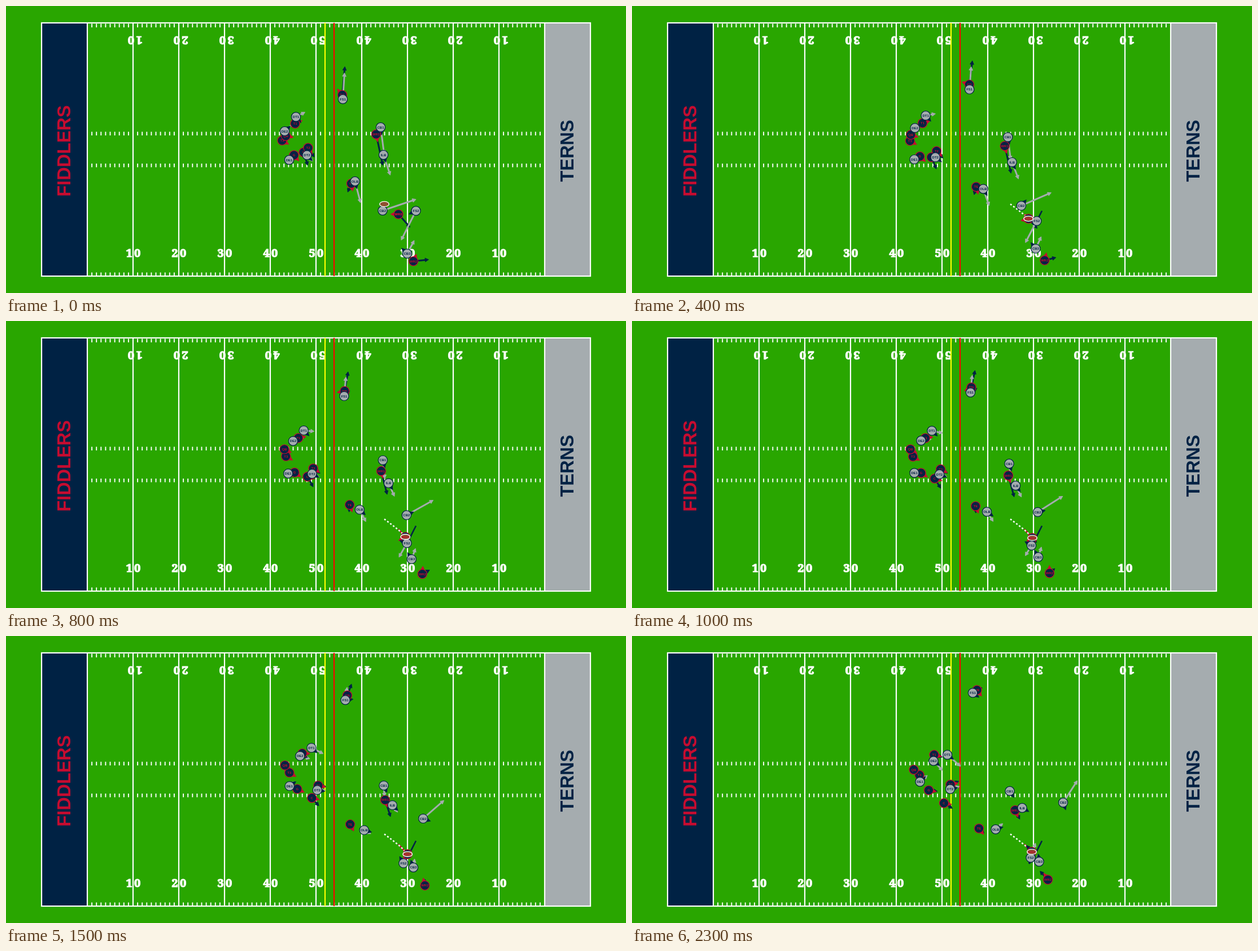
Write an HTML page that moves like this. It is 1098 px wide and 510 px high and loops after 2400 ms.

```html
<!DOCTYPE html>
<html lang="en">
<head>
<meta charset="utf-8">
<title>Football play</title>
<style>
  html, body { margin: 0; width: 100%; height: 100%; overflow: hidden; background: #29a600; }
  svg { display: block; width: 1098px; height: 510px; }
  text { text-anchor: middle; }
  .zone { font: bold 32.5px "Liberation Sans", Arial, sans-serif; }
  .yards {
    font: 900 20px "Noto Serif", serif; letter-spacing: 3.4px;
    fill: #fff; stroke: #fff; stroke-width: 1.2px;
  }
  .label { font: bold 6px "Liberation Sans", Arial, sans-serif; }
</style>
</head>
<body>
<svg id="stage" viewBox="0 0 1098 510"></svg>
<script>
const NAVY = '#002244', RED = '#c60c30', GRAY = '#a5acaf', WHITE = '#fff';
const LOOP = 2400, STEP = 100;
const MIDDLE = 1, END = 2.3;
const stage = document.getElementById('stage');

function add(parent, tag, attrs, text) {
  const el = document.createElementNS('http://www.w3.org/2000/svg', tag);
  for (const key in attrs) el.setAttribute(key, attrs[key]);
  if (text) el.textContent = text;
  parent.appendChild(el);
  return el;
}

// Field
const LEFT = 144, TOP = 30, BOTTOM = 480, YARD = 8.1;

function vertical(x, color) {
  add(stage, 'path', { d: `M${x} ${TOP}V${BOTTOM}`, stroke: color, 'stroke-width': 2.2 });
}

function endZone(x, fill, color, name, baseline) {
  add(stage, 'rect', { x, y: TOP, width: 81, height: BOTTOM - TOP, fill });
  add(stage, 'text', {
    class: 'zone', fill: color, transform: `translate(${baseline} 257.5) rotate(-90)`
  }, name);
}

function drawField() {
  add(stage, 'rect', { width: 1098, height: 510, fill: '#29a600' });
  endZone(63, NAVY, RED, 'FIDDLERS', 114);
  endZone(954, GRAY, NAVY, 'TERNS', 1004.5);

  let ticks = '';
  for (let yard = 1; yard < 100; yard++) {
    const x = (LEFT + yard * YARD).toFixed(1);
    for (const y of [31.5, 223.5, 280, 473.5]) ticks += `M${x} ${y}v6.5`;
  }
  add(stage, 'path', { d: ticks, stroke: WHITE, 'stroke-width': 1.9 });

  for (let i = 0; i <= 10; i++) vertical(LEFT + i * 81, WHITE);
  add(stage, 'rect', {
    x: 63, y: TOP, width: 972, height: BOTTOM - TOP, fill: 'none', stroke: WHITE, 'stroke-width': 2.2
  });

  for (let i = 1; i < 10; i++) {
    const x = LEFT + i * 81 + 2, yards = 50 - Math.abs(5 - i) * 10;
    add(stage, 'text', { class: 'yards', x, y: 446 }, yards);
    add(stage, 'text', { class: 'yards', transform: `translate(${x} 53.5) rotate(180)` }, yards);
  }
  vertical(565, '#ff0');
  vertical(581, '#f00');
}

drawField();
const trails = add(stage, 'g', { fill: 'none' });
const arrows = add(stage, 'g', {});
const bodies = add(stage, 'g', {});
const updates = [];

// Constant acceleration through three points at 0, MIDDLE and END.
function curve(p, q, r) {
  const first = (q - p) / MIDDLE, second = (r - q) / (END - MIDDLE);
  const bend = (second - first) / END, speed = first - bend * MIDDLE;
  return { at: t => p + t * (speed + bend * t), speed: t => speed + 2 * bend * t };
}

function route(start, middle, end) {
  const [x, y] = [0, 1].map(k => curve(start[k], middle[k], end[k]));
  return {
    at: t => [x.at(t), y.at(t)],
    pace: t => Math.hypot(x.speed(t), y.speed(t)),
    heading: t => Math.atan2(y.speed(t), x.speed(t)) * 180 / Math.PI
  };
}

function trail(at, attrs) {
  const line = add(trails, 'polyline', attrs);
  updates.push(t => {
    const points = [];
    for (let i = 0; i <= Math.round(t * 10); i++) points.push(at(i / 10).join());
    line.setAttribute('points', points.join(' '));
  });
}

const offense = { fill: NAVY, edge: RED }, defense = { fill: GRAY, edge: NAVY };

// The arrow reaches one second ahead; the pointer turns evenly between two looks,
// which follow the run unless given.
function player(name, team, start, middle, end, look = {}) {
  const run = route(start, middle, end);
  const { from = run.heading(0), to = run.heading(2) } = look;
  const turn = (to - from + 540) % 360 - 180;

  const under = add(arrows, 'g', {});
  const arrow = add(under, 'g', { fill: team.fill, stroke: team.fill });
  const shaft = add(arrow, 'path', { 'stroke-width': 3 });
  const head = add(arrow, 'path', { d: 'M0 0l-6-3.2v6.4z', 'stroke-linejoin': 'round' });
  const pointer = add(under, 'path', { d: 'M14.5 0l-8-4.2v8.4z', fill: team.edge });
  const body = add(bodies, 'g', {});
  add(body, 'circle', { r: 8.1, fill: team.fill, stroke: team.edge, 'stroke-width': 1.2 });
  add(body, 'text', { class: 'label', y: 2.1, fill: team.edge }, name);

  updates.push(t => {
    const pace = run.pace(t), place = `translate(${run.at(t)})`;
    under.setAttribute('transform', place);
    body.setAttribute('transform', place);
    arrow.setAttribute('transform', `rotate(${run.heading(t)})`);
    shaft.setAttribute('d', `M0 0H${Math.max(0, pace - 5)}`);
    head.setAttribute('transform', `translate(${pace})`);
    pointer.setAttribute('transform', `rotate(${from + turn * t / END})`);
  });
  return run;
}

player('RB', offense, [595.5, 158], [601, 118], [611, 96], { from: 230, to: 53 });
player('T1', offense, [512, 209], [519.5, 208], [535, 211]);
player('T3', offense, [489, 239], [497.5, 241], [509, 247], { from: 30 });
player('QB', offense, [495.5, 231], [493, 228], [499, 237.5], { from: 10 });
player('C', offense, [527, 260], [536, 280], [552.5, 297], { from: 20, to: 10 });
player('T2', offense, [535, 252], [546.5, 263.5], [564, 264]);
player('G', offense, [510, 265], [512, 270], [525.5, 274], { from: 50 });
player('TE', offense, [611.5, 315.5], [608.5, 329], [614.5, 342], { from: 80 });
player('WR1', offense, [655.5, 228], [666.5, 274.5], [678.5, 309.5]);
player('WR2', offense, [721.5, 453.5], [739.5, 448], [736.5, 433], { from: -67 });
const carrier = player('WR3', offense, [695, 370], [709, 385.5], [708, 383.5], { from: 180, to: 95 });

player('FS1', defense, [596.5, 165.5], [599.5, 127], [603.5, 101], { to: 36 });
player('DT1', defense, [513.5, 197], [531, 195], [558.5, 211], { from: 50 });
player('DE2', defense, [493.5, 222.5], [512, 212.5], [534, 222]);
player('DE1', defense, [501.5, 273.5], [500, 270], [510, 259], { from: -20 });
player('DT2', defense, [533, 265], [544.5, 272.5], [563.5, 272]);
player('CB1', defense, [663.5, 215.5], [668, 253.5], [669, 275.5], { to: 57 });
player('ILB', defense, [668.5, 264.5], [679.5, 292.5], [691, 305.5]);
player('OLB', defense, [618, 311.5], [628.5, 339], [644, 343.5]);
player('CB2', defense, [667, 363.5], [718.5, 339.5], [763.5, 296], { from: -75, to: 70 });
player('CB3', defense, [710.5, 440], [719.5, 419.5], [721, 401], { from: 225 });
const tackler = player('FS2', defense, [726, 364], [707.5, 399], [706, 394], { from: 155 });

// The ball flies straight to the carrier and stays with him.
const FLIGHT = 0.22, THROWN = [670, 352];
function ballAt(t) {
  const flown = Math.min(1, t / FLIGHT), target = carrier.at(t);
  return THROWN.map((p, k) => p + (target[k] - p) * flown);
}
const ball = add(stage, 'ellipse', { rx: 8.3, ry: 4.6, fill: '#8f5030', stroke: WHITE, 'stroke-width': 1.4 });
const carrierLabel = add(stage, 'text', { class: 'label', y: 2.1, fill: RED }, 'WR3');
updates.push(t => {
  ball.setAttribute('transform', `translate(${ballAt(t)})`);
  carrierLabel.setAttribute('transform', `translate(${carrier.at(t)})`);
});

trail(carrier.at, { stroke: RED, 'stroke-width': 2.6 });
trail(tackler.at, { stroke: NAVY, 'stroke-width': 2.6 });
trail(ballAt, { stroke: WHITE, 'stroke-width': 2.5, 'stroke-dasharray': '3 3.4' });

let shown = -1;
function frame() {
  const step = Math.floor(performance.now() % LOOP / STEP);
  if (step !== shown) {
    shown = step;
    updates.forEach(update => update(step * STEP / 1000));
  }
  requestAnimationFrame(frame);
}
frame();
</script>
</body>
</html>
```
